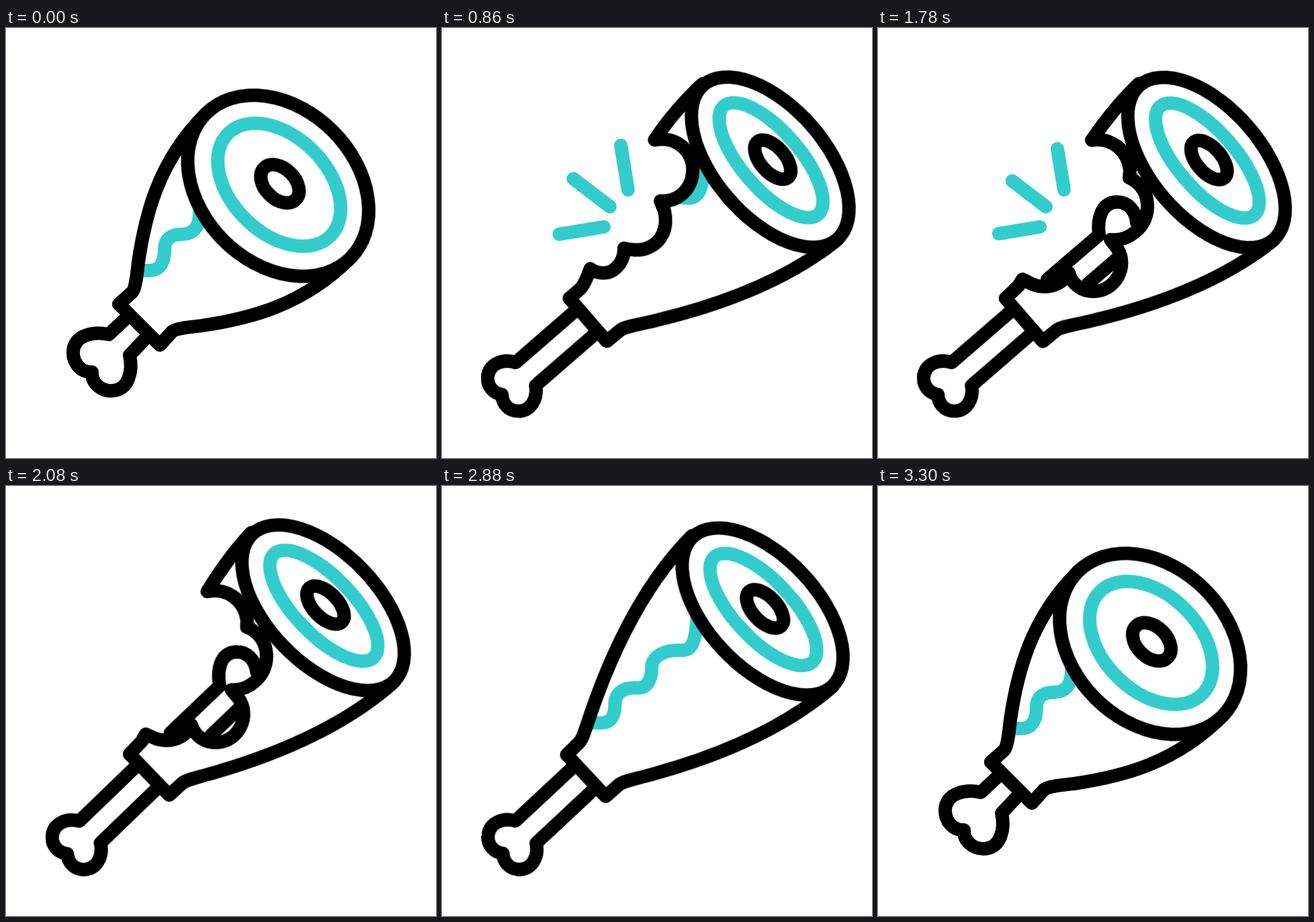
An HTML page for the animation above (3.6 s loop, 640 px wide and 640 px high).

```html
<!DOCTYPE html>
<html lang="en">
<head>
<meta charset="utf-8">
<title>Ham</title>
<style>
html, body { margin: 0; width: 100%; height: 100%; overflow: hidden; background: #fff; }
svg { display: block; width: 100%; height: 100%; }
path, ellipse { fill: none; stroke: #000; stroke-width: 20; stroke-linecap: round; stroke-linejoin: round; }
.teal { stroke: #3cc; }
.wave, .stub { stroke-linecap: butt; }

/* --a is the resting shape, --b the stretched one */
.morph { animation: morph 3600ms linear infinite; }
@keyframes morph {
  0%, 91.667%, 100% { d: var(--a); }
  10%, 81.667% { d: var(--b); }
}
.bone {
  --a: path("M183 428 L153 456 C132 451 100 456 100 483 C100 499 112 513 128 512 C127 528 141 540 157 540 C184 540 189 508 184 487 L212 457");
  --b: path("M190 418 L109 499 C89 494 69 504 69 524 C69 537 79 547 92 548 C93 561 103 571 116 571 C136 571 146 551 141 531 L222 450");
}
.wave {
  --a: path("M365 185 C365 205 355 232 330 236 C305 238 288 250 288 275 C288 297 278 307 262 307 C247 307 236 313 236 329 C236 352 227 361 213 361 L200 361");
  --b: path("M369 172 C369 222 365 237 346 237 C321 236 303 249 304 264 C304 287 296 296 281 295 C263 295 251 303 251 320 C252 340 244 349 231 349 L214 349");
}
.left {
  --a: path("M298 127 C226 198 207 280 197 348 C195 366 193 387 188 393 L168 411");
  --b: path("M357 66 C290 138 244 240 213 344 C208 361 205 373 200 379 L182 398");
}
.right {
  --a: path("M168 411 L229 472 L247 452 C253 447 274 445 292 443 C360 433 442 414 513 342");
  --b: path("M182 398 L242 458 L261 440 C267 435 279 432 296 427 C400 396 502 350 574 283");
}

.oval { animation: oval 3600ms linear infinite; }
@keyframes oval {
  0%, 91.667%, 100% { transform: translate(var(--pa)) rotate(45deg); rx: var(--xa); ry: var(--ya); }
  10%, 81.667% { transform: translate(var(--pb)) rotate(45deg); rx: var(--xb); ry: var(--yb); }
}
.face { fill: #fff; --pa: 405px, 235px; --xa: 152px; --ya: 115px; --pb: 466px, 175px; --xb: 152px; --yb: 82px; }
.ring { --pa: 406.5px, 233.5px; --xa: 107.8px; --ya: 71.6px; --pb: 467px, 172px; --xb: 107px; --yb: 43px; }
.hole { --pa: 407.5px, 232px; --xa: 33.3px; --ya: 22.6px; --pb: 469.5px, 171px; --xb: 35px; --yb: 18.5px; }

.ham { transform-origin: 125px 508px; animation: wobble 3600ms linear infinite; }
@keyframes wobble {
  0%, 18.333%, 36.667%, 45%, 58.889%, 65.556%, 81.667%, 100% { transform: rotate(0deg); }
  27.361%, 52.083% { transform: rotate(6.5deg); }
  69.778% { transform: rotate(5.2deg); }
  73.75% { transform: rotate(-4.8deg); }
  77.722% { transform: rotate(4.7deg); }
}

.whole { animation: whole 3600ms step-end infinite; }
.bite1 { animation: bite1 3600ms step-end infinite; }
.bite2 { animation: bite2 3600ms step-end infinite; }
@keyframes whole { 0%, 73.889% { visibility: visible; } 18.889% { visibility: hidden; } }
@keyframes bite1 { 0%, 45.556% { visibility: hidden; } 18.889% { visibility: visible; } }
@keyframes bite2 { 0%, 73.889% { visibility: hidden; } 45.556% { visibility: visible; } }

/* each spark shoots outwards, then its tail follows */
.sparks { animation: flash 3600ms step-end infinite; }
.sparks path { stroke-dasharray: 1 2; animation: shoot 3600ms infinite; }
@keyframes flash {
  0%, 30%, 56.667% { visibility: hidden; }
  18.889%, 45.556% { visibility: visible; }
}
@keyframes shoot {
  0%, 18.889%, 45.556% { stroke-dashoffset: 1; animation-timing-function: cubic-bezier(.5, 1, .89, 1); }
  24.444%, 51.111% { stroke-dashoffset: 0; animation-timing-function: cubic-bezier(.11, 0, .5, 0); }
  30%, 56.667% { stroke-dashoffset: -1; animation-timing-function: step-end; }
  100% { stroke-dashoffset: 1; }
}
</style>
</head>
<body>
<svg viewBox="0 0 640 640">
  <g class="ham">
    <path class="morph bone"/>
    <g class="whole">
      <path class="morph wave teal"/>
      <path class="morph left"/>
    </g>
    <g class="bite1">
      <path class="stub teal" d="M369 172 C369 222 365 237 346 237 L328 237"/>
      <path d="M357 66 C333 92 310 122 292 154 C325 145 352 168 352 198 C352 222 335 244 307 244 L314 258 C322 285 312 305 295 314 C283 321 270 320 258 318 C260 340 245 357 228 357 C220 357 214 355 210 352 C207 362 204 374 198 382 L182 398"/>
    </g>
    <path class="morph right"/>
    <ellipse class="oval face"/>
    <ellipse class="oval ring teal"/>
    <ellipse class="oval hole"/>
    <g class="bite2" transform="rotate(-4.1 125 508)">
      <path d="M388 83 C362 108 340 135 318 167 C347 162 372 182 375 212 L374 223 C394 232 402 250 401 268 C399 298 372 318 346 315 L356 328 C374 356 352 392 321 392 C303 392 288 381 284 364 C272 386 245 390 225 379 L215 374 L209 384 L190 402"/>
      <path d="M252 374 L329 308 C326 285 332 259 356 259 C372 259 384 272 385 290 M355 344 L312 381"/>
      <circle cx="385" cy="217" r="1.6" fill="#1a7a7a"/>
    </g>
  </g>
  <g class="sparks">
    <path class="teal" pathLength="1" d="M277 241 L266 174"/>
    <path class="teal" pathLength="1" d="M250 266 L195 224"/>
    <path class="teal" pathLength="1" d="M241 296 L174 307"/>
  </g>
</svg>
</body>
</html>
```
